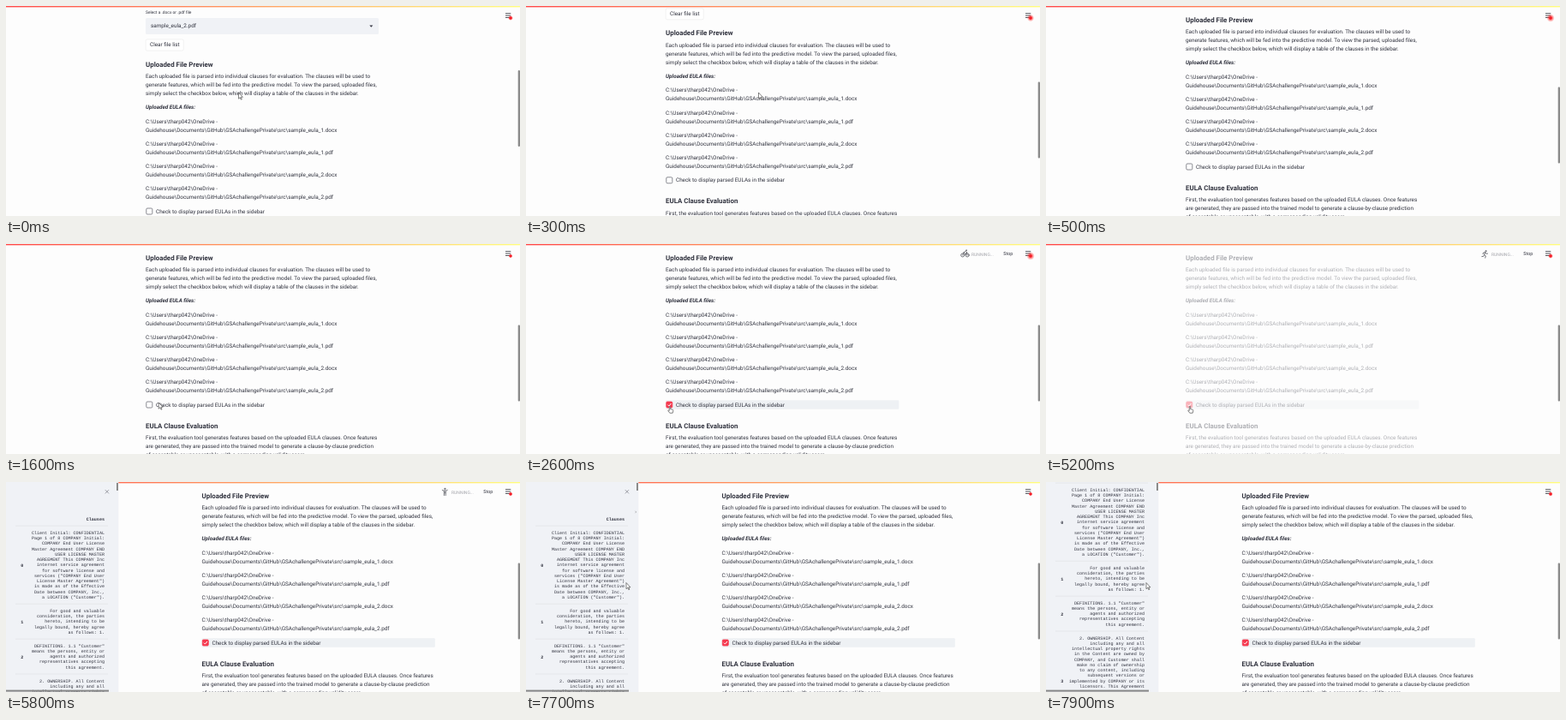
Animation, 600 px wide and 245 px high, one loop 8 s. Source, as an HTML page:

```html
<!DOCTYPE html>
<html lang="en">
<head>
<meta charset="utf-8">
<title>File preview</title>
<style>
html, body { margin: 0; width: 100%; height: 100%; overflow: hidden; background: #fdfdfd; }
svg { display: block; width: 600px; height: 245px; }
text { font: 6.35px Roboto, sans-serif; fill: #31333f; text-rendering: geometricPrecision; white-space: pre; }
.head { font-size: 7.9px; font-weight: 600; }
.small { font-size: 4.9px; }
.note { font-weight: 700; font-style: italic; }
.run { font-size: 5px; fill: #a3a4aa; }
.stop { font-size: 5.4px; }
.mono { font: 5.07px "Liberation Mono", monospace; text-anchor: end; }
.bold { font-weight: 700; }
.pose { fill: none; stroke: #66676e; stroke-width: .9; stroke-linecap: round; stroke-linejoin: round; }
</style>
</head>
<body>
<svg viewBox="0 0 600 245">
  <defs>
    <linearGradient id="bar"><stop stop-color="#ff4b4b"/><stop offset="1" stop-color="#fffd80"/></linearGradient>
    <radialGradient id="halo"><stop offset=".3" stop-color="#f22" stop-opacity=".75"/><stop offset="1" stop-color="#f22" stop-opacity="0"/></radialGradient>
  </defs>
  <g id="main">
    <rect x="163" y="-38" width="272" height="19" rx="1.5" fill="#f0f2f6"/>
    <path d="M424.3 -29.5h4l-2 2.2z" fill="#31333f"/>
    <rect x="163.2" y="-13" width="44" height="13" rx="1.5" fill="#fff" stroke="#31333f" stroke-opacity=".12" stroke-width=".5"/>
    <rect id="focus" x="163" y="182.3" width="272.3" height="10.4" rx="1" fill="#eef1f4"/>
    <rect id="box" x="163.8" y="184" width="7" height="7" rx="1.2" stroke-width=".8"/>
    <path id="tick" d="M165.4 187.6l1.5 1.5 2.5-3.1" fill="none" stroke="#fff" stroke-width="1"/>
  </g>
  <rect width="600" height="1.4" fill="url(#bar)"/>
  <rect id="thumb" x="597.7" width="2.3" height="89" rx="1" fill="#8b8b8b"/>
  <g id="side">
    <rect width="131.3" height="245" fill="#f0f2f6"/>
    <g id="table"></g>
    <rect x="129" y="1" width="1.9" height="9" fill="#858585"/>
    <rect y="242.6" width="120" height="2" fill="#858585"/>
  </g>
  <g id="status">
    <g class="pose">
      <circle cx="509.7" cy="13" r="2"/><circle cx="515.2" cy="13" r="2"/>
      <path d="M509.7 13l1.3-3.2 2.2 2.6 1.2-2.8.8 3.4M511 9.8l2.2-1.3 1.6 1.2"/><circle cx="514" cy="7.3" r=".5"/>
    </g>
    <g class="pose">
      <circle cx="513.4" cy="8.2" r=".6"/>
      <path d="M512.8 9.6l-1.2 3 1.7 1.2-.6 2.4M511.6 12.6l-.8 1.7-2 .3M510 11.6l.6-1.6 2.2-.2 1.2 1.6 1.5-.3"/>
    </g>
    <g class="pose">
      <circle cx="512.3" cy="8" r=".7"/>
      <path d="M509.3 9.4l1.6.8h2.8l1.6-.8M511.4 10.4v5.3M513.2 10.4v5.3M511.4 12.6h1.8"/>
    </g>
  </g>
  <path d="M583 8.7h6.3M583 11.1h6.3M583 13.5h6.3" stroke="#45464f" stroke-width=".9"/>
  <circle id="glow" cx="589" cy="14" fill="url(#halo)"/>
  <circle cx="589" cy="14" r="1.7" fill="#f21d28"/>
  <path id="arrow" d="M0 0v7.2l1.7-1.5 1.1 2.5 1-.4-1.1-2.5h2.2z" fill="#fff" stroke="#333" stroke-width=".6"/>
  <path id="hand" d="M0 .6q.8-1 1.3 0v3l2.6.6q.8.3.6 1.4l-.6 2.6h-3.4l-2-2.8q0-1 1.5 0z" fill="#fff" stroke="#333" stroke-width=".6"/>
</svg>
<script>
const $ = id => document.getElementById(id);
const NS = "http://www.w3.org/2000/svg";

function write(parent, str, x, middle, cls = "") {
  const el = document.createElementNS(NS, "text");
  el.setAttribute("x", x);
  el.setAttribute("y", middle + 2.1);
  el.setAttribute("class", cls);
  el.textContent = str;
  parent.append(el);
}

// Main column
const X = 163;
const main = $("main");
const lines = (rows, y) => rows.forEach((s, i) => write(main, s, X, y + i * 10));
write(main, "Select a .docx or .pdf file", X, -45.3, "small");
write(main, "sample_eula_2.pdf", 169, -28.7);
write(main, "Clear file list", 168, -7);
write(main, "Uploaded File Preview", X, 16.4, "head");
lines([
  "Each uploaded file is parsed into individual clauses for evaluation. The clauses will be used to",
  "generate features, which will be fed into the predictive model. To view the parsed, uploaded files,",
  "simply select the checkbox below, which will display a table of the clauses in the sidebar."
], 30);
write(main, "Uploaded EULA files:", X, 66.2, "note");
["1.docx", "1.pdf", "2.docx", "2.pdf"].forEach((name, i) => lines([
  "C:\\Users\\tharp042\\OneDrive -",
  "Guidehouse\\Documents\\GitHub\\GSAchallengePrivate\\src\\sample_eula_" + name
], 82.4 + i * 26.3));
write(main, "Check to display parsed EULAs in the sidebar", 175, 187.5);
write(main, "EULA Clause Evaluation", X, 212.4, "head");
lines([
  "First, the evaluation tool generates features based on the uploaded EULA clauses. Once features",
  "are generated, they are passed into the trained model to generate a clause-by-clause prediction",
  "of acceptable or unacceptable, with a corresponding validity score."
], 226);

// Sidebar table
const table = $("table");
const clauses = [
  `Client Initial: CONFIDENTIAL
Page 1 of 8 COMPANY Initial:
COMPANY End User License
Master Agreement COMPANY END
USER LICENSE MASTER
AGREEMENT This COMPANY Inc
internet service agreement
for software license and
services ("COMPANY End User
License Master Agreement")
is made as of the Effective
Date between COMPANY, Inc.,
a LOCATION ("Customer").`,
  `For good and valuable
consideration, the parties
hereto, intending to be
legally bound, hereby agree
as follows: 1.`,
  `DEFINITIONS. 1.1 "Customer"
means the persons, entity or
agents and authorized
representatives accepting
this agreement.`,
  `2. OWNERSHIP. All Content
including any and all
intellectual property rights
in the Content are owned by
COMPANY, and Customer shall
make no claim of ownership
to any content, including
subsequent versions or
implemented by COMPANY or its
licensors. This Agreement` + "\n".repeat(7)
];
const STEP = 6.27;
let y = 59, rules = "M115.8 9.2l4.2 4.2m0-4.2l-4.2 4.2";
let borders = "";
write(table, "Clauses", 115, 43, "mono bold");
clauses.forEach((text, i) => {
  const rows = text.split("\n");
  borders += `M11 ${y - 7.8}h108`;
  write(table, String(i), 20.3, y + (rows.length - 1) * STEP / 2, "mono bold");
  rows.forEach((s, k) => s && write(table, s, 115, y + k * STEP - .4, "mono"));
  y += (rows.length - 1) * STEP + 15.8;
});
table.insertAdjacentHTML("beforeend",
  `<path d="${borders}" stroke="#31333f" stroke-opacity=".12" stroke-width=".5"/>
   <path d="${rules}" stroke="#777982" stroke-width=".7"/>
   <path id="chevron" d="M127.5 33.8l1.2 1.2-1.2 1.2" fill="none" stroke="#888" stroke-width=".6"/>`);

const status = $("status");
const poses = [...document.querySelectorAll(".pose")];
write(status, "RUNNING...", 520, 11.8, "run");
write(status, "Stop", 557.3, 11.3, "stop");

// Eased progress from 0 to 1 between two times
function ease(t, a, b) {
  const p = Math.min(1, Math.max(0, (t - a) / (b - a)));
  return p * p * (3 - 2 * p);
}
const show = (el, on) => el.style.display = on ? "" : "none";
const move = (el, x, y) => el.setAttribute("transform", `translate(${x} ${y})`);

function draw(t) {
  const scroll = ease(t, 60, 440);
  const open = ease(t, 5450, 5760);
  move(main, 65.5 * open, 52 * (1 - scroll));
  main.setAttribute("opacity", t < 5450 ? 1 - .62 * ease(t, 2600, 4150) : 1);
  $("thumb").setAttribute("y", 75 + 19.5 * scroll);

  const checked = t >= 2100;
  show($("focus"), checked);
  show($("tick"), checked);
  $("box").setAttribute("fill", checked ? "#f63a50" : "#fff");
  $("box").setAttribute("stroke", checked ? "#f63a50" : "#6d6e77");

  show($("side"), open > 0);
  move($("side"), -131.3 * (1 - open), 0);
  move(table, 0, -50 * ease(t, 7710, 7890));
  show($("chevron"), t > 6600);

  show(status, t >= 2300 && t < 6700);
  poses.forEach((p, i) => show(p, Math.floor(t / 400) % 3 === i));
  $("glow").setAttribute("r", 3.4 + 1.3 * Math.sin(Math.PI * (t / 1000 - .1)));

  const toBox = ease(t, 1000, 1750), toSide = ease(t, 6500, 7100);
  show($("arrow"), t < 400 || t >= 1000 && t < 1750 || t >= 6500);
  show($("hand"), t >= 1750 && t < 5450);
  if (t < 400) move($("arrow"), 271.5, 101);
  else if (t < 1750) move($("arrow"), 271.5 - 104 * toBox, 150 + 39 * toBox);
  else move($("arrow"), 168 - 51 * toSide, 189 - 71.5 * toSide);
  move($("hand"), 167.3, 189);
}

const start = performance.now();
function tick() {
  draw((performance.now() - start) % 8000);
  requestAnimationFrame(tick);
}
tick();
</script>
</body>
</html>
```
